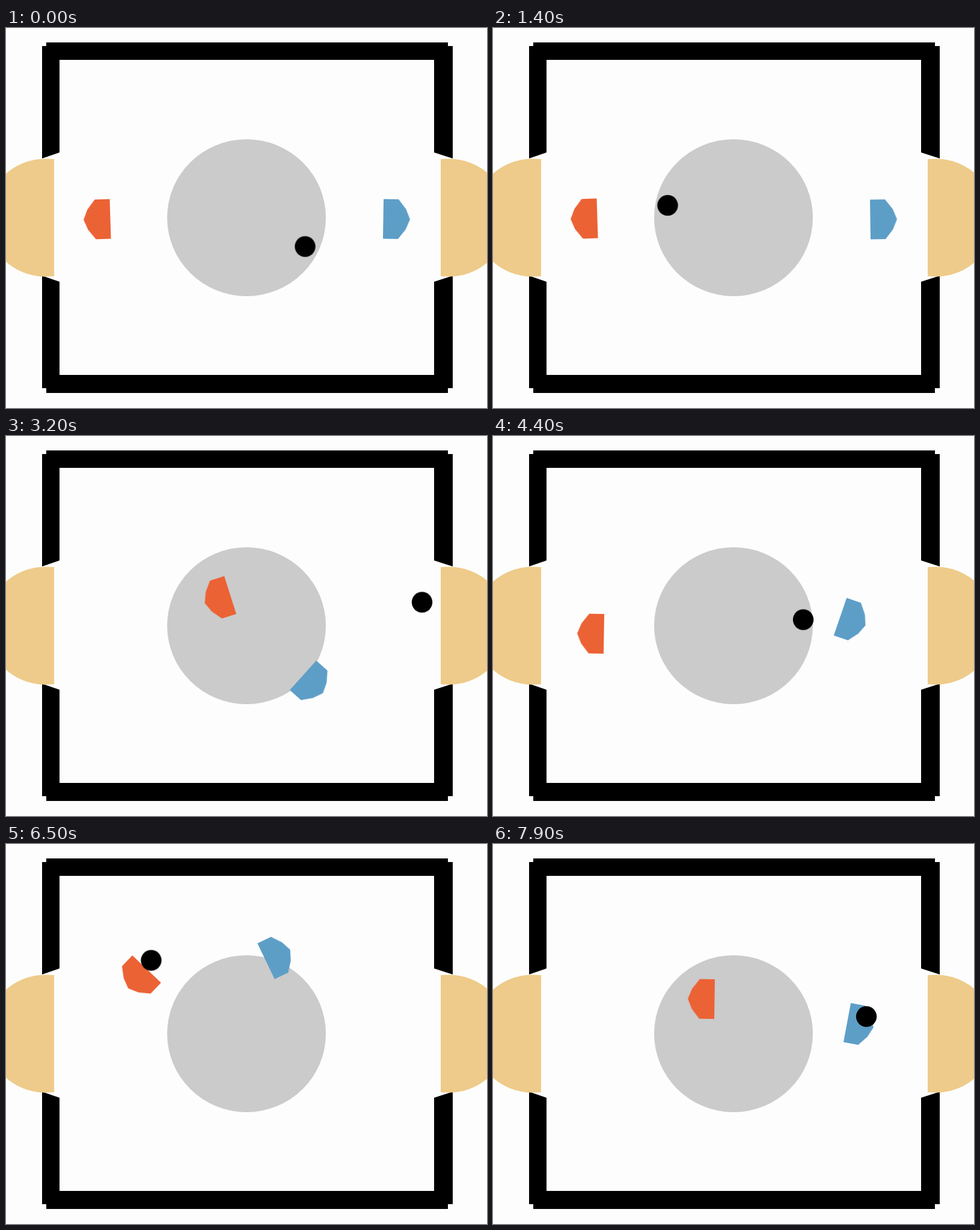
These frames come from a looping animation (800 by 632 pixels, 8 s). An HTML page:

```html
<!DOCTYPE html>
<html lang="en">
<head>
<meta charset="utf-8">
<title>Air hockey</title>
<style>
  html, body { margin: 0; width: 100%; height: 100%; overflow: hidden; background: #fdfdfd; }
  svg { display: block; width: 800px; height: 632px; }
  .spot { fill: #cbcbcb; }
  .goal { fill: #eecb8a; }
  .orange { fill: #eb6235; }
  .blue { fill: #5d9ec7; }
  .ball, .orange, .blue { animation: 8s infinite step-end; }
  .ball { animation-name: ball; }
  .orange { animation-name: orange; }
  .blue { animation-name: blue; }

  /* Ten poses a second: steps(n) spans n * 1.25% of the loop.
     New rallies start at 17.5%, 42.5% and 52.5%. */
  @keyframes ball {
    0%     { transform: translate(497.5px, 363.5px); }
    3.75%  { transform: translate(497.5px, 363.5px); animation-timing-function: steps(4); }
    8.75%  { transform: translate(190px, 330px); }
    11.25% { transform: translate(190px, 330px); animation-timing-function: steps(4); }
    16.25% { transform: translate(723px, 300px); }
    17.5%  { transform: translate(290.5px, 295px); }
    21.25% { transform: translate(290.5px, 295px); animation-timing-function: steps(3); }
    25%    { transform: translate(320px, 296px); animation-timing-function: steps(3); }
    28.75% { transform: translate(560px, 345px); }
    31.25% { transform: translate(560px, 345px); animation-timing-function: steps(3); }
    35%    { transform: translate(355px, 280px); animation-timing-function: steps(2); }
    37.5%  { transform: translate(390px, 272px); animation-timing-function: steps(2); }
    40%    { transform: translate(692px, 276.5px); }
    41.25% { transform: translate(725px, 277px); }
    42.5%  { transform: translate(300px, 318px); }
    46.25% { transform: translate(300px, 318px); animation-timing-function: steps(4); }
    51.25% { transform: translate(725px, 290px); }
    52.5%  { transform: translate(516px, 305.5px); }
    56.25% { transform: translate(516px, 305.5px); animation-timing-function: steps(3); }
    60%    { transform: translate(480px, 290px); animation-timing-function: steps(4); }
    65%    { transform: translate(106.5px, 138.5px); animation-timing-function: steps(3); }
    68.75% { transform: translate(273px, 70px); animation-timing-function: steps(4); }
    73.75% { transform: translate(425px, 175px); }
    76.25% { transform: translate(425px, 175px); animation-timing-function: steps(2); }
    78.75% { transform: translate(262px, 182px); animation-timing-function: steps(2); }
    81.25% { transform: translate(241.5px, 193.5px); }
    82.5%  { transform: translate(241.5px, 193.5px); animation-timing-function: steps(2); }
    85%    { transform: translate(355px, 70px); animation-timing-function: steps(5); }
    91.25% { transform: translate(694px, 425px); animation-timing-function: steps(6); }
    98.75%, 100% { transform: translate(621px, 287px); }
  }
  @keyframes orange {
    0%     { transform: translate(173.5px, 317.5px) rotate(-1.8deg); animation-timing-function: steps(7); }
    8.75%  { transform: translate(175px, 328px) rotate(-3deg); animation-timing-function: steps(6); }
    16.25% { transform: translate(230px, 318px) rotate(-4deg); }
    17.5%  { transform: translate(173.5px, 316.5px) rotate(-1.8deg); animation-timing-function: steps(3); }
    21.25% { transform: translate(270px, 298px) rotate(-2deg); animation-timing-function: steps(3); }
    25%    { transform: translate(300px, 296px) rotate(8deg); animation-timing-function: steps(12); }
    40%    { transform: translate(373px, 264.5px) rotate(-17.6deg); }
    41.25% { transform: translate(374px, 263px) rotate(-19deg); }
    42.5%  { transform: translate(173.5px, 317.5px) rotate(-1deg); animation-timing-function: steps(4); }
    47.5%  { transform: translate(280px, 318px) rotate(-3deg); animation-timing-function: steps(3); }
    51.25% { transform: translate(270px, 316px) rotate(-4deg); }
    52.5%  { transform: translate(173.5px, 317.5px) rotate(0deg); animation-timing-function: steps(2); }
    55%    { transform: translate(184.5px, 329px) rotate(.9deg); animation-timing-function: steps(8); }
    65%    { transform: translate(181px, 201px) rotate(-31.3deg); animation-timing-function: steps(2); }
    67.5%  { transform: translate(205px, 202px) rotate(-35deg); animation-timing-function: steps(11); }
    81.25% { transform: translate(234px, 208px) rotate(-46.2deg); animation-timing-function: steps(2); }
    83.75% { transform: translate(240px, 206px) rotate(-45deg); animation-timing-function: steps(12); }
    98.75%, 100% { transform: translate(368.5px, 258px) rotate(.9deg); }
  }
  @keyframes blue {
    0%     { transform: translate(627.5px, 317.5px) rotate(.9deg); animation-timing-function: steps(3); }
    3.75%  { transform: translate(517px, 360px) rotate(5deg); animation-timing-function: steps(10); }
    16.25% { transform: translate(560px, 340px) rotate(3deg); }
    17.5%  { transform: translate(627.5px, 318.5px) rotate(-.9deg); animation-timing-function: steps(9); }
    28.75% { transform: translate(578px, 347px) rotate(15deg); animation-timing-function: steps(9); }
    40%    { transform: translate(494px, 398px) rotate(41.9deg); }
    41.25% { transform: translate(488px, 402px) rotate(44deg); }
    42.5%  { transform: translate(627.5px, 317.5px) rotate(0deg); animation-timing-function: steps(7); }
    51.25% { transform: translate(590px, 325px) rotate(6deg); }
    52.5%  { transform: translate(627.5px, 317.5px) rotate(0deg); animation-timing-function: steps(2); }
    55%    { transform: translate(577.5px, 300.5px) rotate(19deg); animation-timing-function: steps(5); }
    61.25% { transform: translate(490px, 295px) rotate(15deg); animation-timing-function: steps(3); }
    65%    { transform: translate(459.5px, 299.5px) rotate(-32deg); animation-timing-function: steps(7); }
    73.75% { transform: translate(450px, 205px) rotate(-30deg); animation-timing-function: steps(6); }
    81.25% { transform: translate(432.5px, 195px) rotate(-25.7deg); animation-timing-function: steps(8); }
    91.25% { transform: translate(545px, 335px) rotate(0deg); animation-timing-function: steps(6); }
    98.75%, 100% { transform: translate(589px, 297px) rotate(10.6deg); }
  }
</style>
</head>
<body>
<svg viewBox="0 0 800 632">
  <defs>
    <path id="racket" d="M0-33V33H-25L-37.5 17L-44.5 0L-37.5-17L-25-33Z"/>
  </defs>
  <ellipse class="spot" cx="400" cy="315.5" rx="132" ry="130.5"/>
  <path d="M67 24H735V30H743V217L712 207V53H89V207L60 217V30H67Z"/>
  <path d="M67 607H735V599H743V412L712 422V577H89V422L60 412V599H67Z"/>
  <path class="goal" d="M80 218L65 217.5A98 98 0 0 0 65 413.5L80 413Z"/>
  <path class="goal" d="M723 218L737 217.5A98 98 0 0 1 737 413.5L723 413Z"/>
  <g class="orange"><use href="#racket"/></g>
  <g class="blue"><use href="#racket" transform="scale(-1 1)"/></g>
  <circle class="ball" r="17.2"/>
</svg>
</body>
</html>
```
